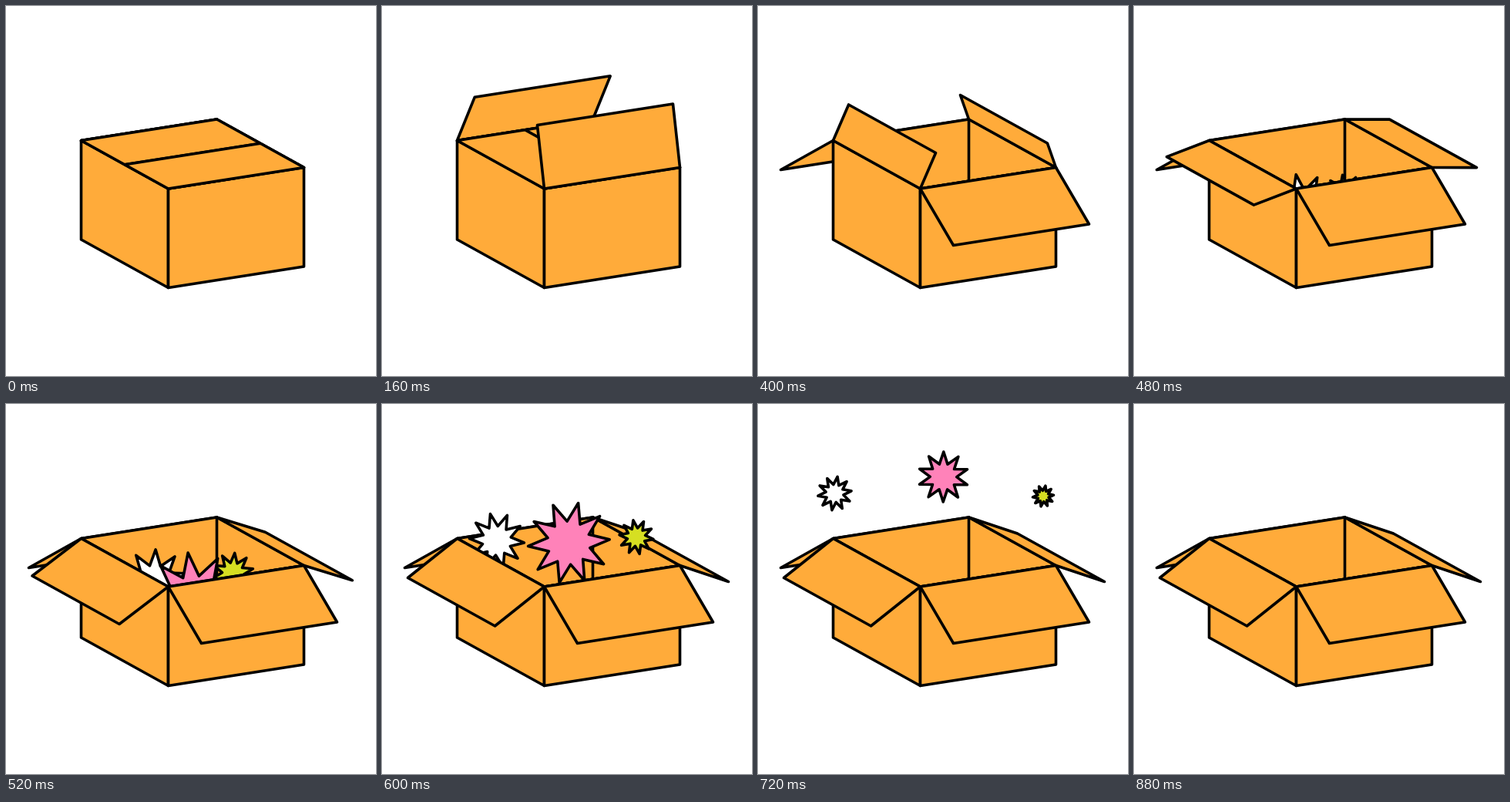
An HTML page with a canvas for the animation above (960 ms loop, 480 px wide and 480 px high).

```html
<!DOCTYPE html>
<html lang="en">
<head>
<meta charset="utf-8">
<title>Opening box</title>
<style>
html, body { margin: 0; width: 100%; height: 100%; overflow: hidden; background: #fff; }
canvas { display: block; width: 480px; height: 480px; }
</style>
</head>
<body>
<canvas id="stage" width="480" height="480"></canvas>
<script>
const ctx = document.getElementById('stage').getContext('2d');
const LOOP = 960, STEP = 40, LAUNCH = 480, VANISH = 880;
const ORANGE = '#ffab3a';

// Top corners of the box: left, back, right, front.
const L = [97.5, 174.5], B = [273.5, 147], R = [386.5, 209.5], F = [210.5, 237];

const add = (a, b) => [a[0] + b[0], a[1] + b[1]];
const half = (a, b) => [(b[0] - a[0]) / 2, (b[1] - a[1]) / 2];
const mix = (a, b, p) => a + (b - a) * p;
const progress = (t, start, length) => Math.min(1, Math.max(0, (t - start) / length));
const easeSine = u => Math.sin(u * Math.PI / 2);
const easeQuad = u => 1 - (1 - u) ** 2;
const down = p => add(p, [0, 128.5]);

// A flap swings its free edge from the middle of the box, through upright and nearly open, to open.
const SWING = [0, 0.45, 0.9, 1];
const front = { hinge: [F, R], path: [half(F, L), [10, -65], [49.5, 55], [43, 73.5]] };
const back = { hinge: [L, B], path: [half(L, F), [10, -66], [-51, 0], [-68, 38]] };
const left = { hinge: [L, F], path: [half(F, R), [20, -46.5], [-55, 21], [-64, 51]] };
const right = { hinge: [B, R], path: [half(R, F), [-11, -31.5], [58, 0], [63, 21]] };

const stars = [
  { fill: '#fff', from: [218, 263], to: [60, 67], size: 45, turn: 8 },
  { fill: '#d6df22', from: [274, 247], to: [402, 77], size: 28, turn: 11 },
  { fill: '#ff82b9', from: [245, 300], to: [239, 26], size: 67, turn: -1 }
];

// Smooth curve through the values at the SWING positions.
function curve(values, p) {
  return values.reduce((sum, v, i) =>
    sum + SWING.reduce((w, k, j) => j === i ? w : w * (p - k) / (SWING[i] - k), v), 0);
}

function trace(points) {
  ctx.beginPath();
  points.forEach(([x, y]) => ctx.lineTo(x, y));
}

function shape(points, fill = ORANGE) {
  trace(points);
  ctx.closePath();
  ctx.fillStyle = fill;
  ctx.fill();
  ctx.stroke();
}

function drawFlap({ hinge: [a, b], path }, p) {
  const edge = [0, 1].map(axis => curve(path.map(v => v[axis]), p));
  shape([a, b, add(b, edge), add(a, edge)]);
}

function drawStar({ fill, from, to, size, turn }, t) {
  const p = easeQuad(progress(t, LAUNCH, LOOP - LAUNCH));
  const r = size * (1 - progress(t, LAUNCH, VANISH - LAUNCH) ** 1.3);
  const center = [mix(from[0], to[0], p), mix(from[1], to[1], p)];
  const points = Array.from({ length: 20 }, (_, i) => {
    const angle = (turn + 74 * p + i * 18) * Math.PI / 180;
    const reach = i % 2 ? r * 0.53 : r;
    return add(center, [reach * Math.cos(angle), reach * Math.sin(angle)]);
  });
  shape(points, fill);
}

function drawInside() {
  shape([L, B, R, F]);
  trace([B, [B[0], 227]]);
  ctx.stroke();
}

// Stars stay hidden below the front rim of the box.
function drawStars(t) {
  if (t < LAUNCH || t >= VANISH) return;
  ctx.save();
  trace([[0, 0], [480, 0], [480, R[1]], R, F, L, [0, L[1]]]);
  ctx.clip();
  stars.forEach(s => drawStar(s, t));
  ctx.restore();
}

function draw(t) {
  const ends = easeSine(progress(t, 125, 161));
  const sides = easeSine(progress(t, 343, 192));

  ctx.fillStyle = '#fff';
  ctx.fillRect(0, 0, 480, 480);
  ctx.lineWidth = 3.6;
  ctx.lineJoin = ctx.lineCap = 'round';
  ctx.strokeStyle = '#000';

  if (ends > 0) drawFlap(back, ends);
  drawInside();
  drawFlap(right, sides);
  drawStars(t);
  shape([L, F, down(F), down(L)]);
  shape([F, R, down(R), down(F)]);
  drawFlap(left, sides);
  if (ends === 0) drawFlap(back, ends);
  drawFlap(front, ends);
}

const start = performance.now();
function tick() {
  const t = (performance.now() - start) % LOOP;
  draw(Math.floor(t / STEP) * STEP);
  requestAnimationFrame(tick);
}
tick();
</script>
</body>
</html>
```
